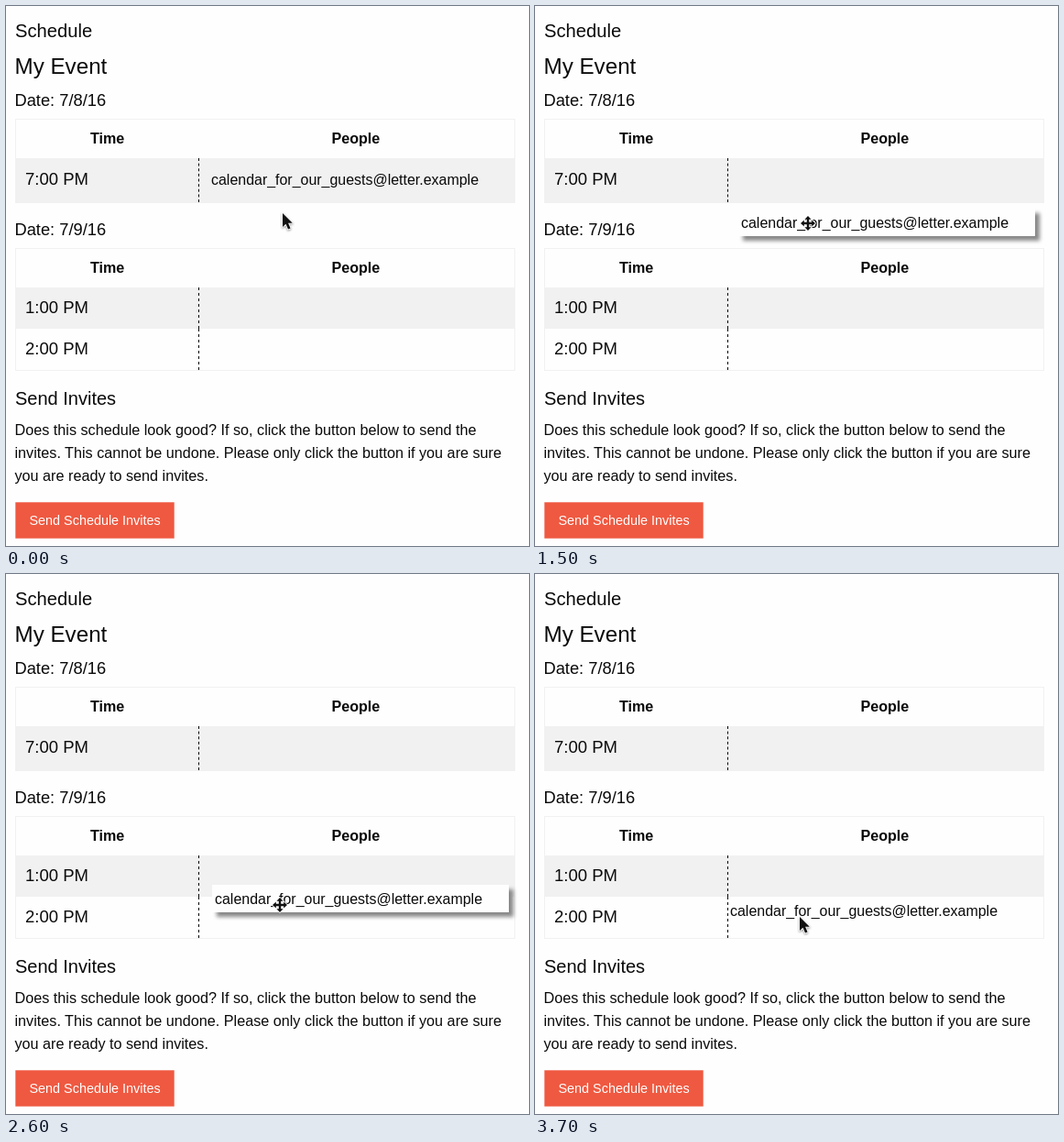
These frames come from a looping animation (571 px wide and 589 px high, 5.2 s). An HTML page:

```html
<!DOCTYPE html>
<html lang="en">
<head>
<meta charset="utf-8">
<title>Schedule</title>
<style>
  html, body { margin: 0; width: 100%; height: 100%; overflow: hidden; background: #fefefe; }
  svg { display: block; width: 571px; height: 589px; font-family: "Liberation Sans", Arial, sans-serif; }
  text { fill: #0a0a0a; }
  .table { fill: none; stroke: #f1f1f1; }
  .row { fill: #f1f1f1; }
  .split { stroke: #0a0a0a; stroke-dasharray: 3; }
  .date { font-size: 18.3px; }
  .head { font-size: 16.1px; font-weight: bold; }
  .time { font-size: 18.5px; }
  .body { font-size: 16.2px; }
  .mail { font-size: 15.96px; }
  #card { fill: #fefefe; filter: drop-shadow(5px 5px 2px #888); }
  #arrow, #cross { fill: #111; stroke: #fff; stroke-width: 1.6; paint-order: stroke; stroke-linejoin: round; }
  #arrow { filter: drop-shadow(0 1px 1px #0006); }
</style>
</head>
<body>
<svg viewBox="0 0 571 589">
  <text x="10" y="34" font-size="20.2">Schedule</text>
  <text x="9.5" y="74" font-size="24.2">My Event</text>

  <text class="date" x="9.5" y="109">Date: 7/8/16</text>
  <rect class="row" x="10" y="166" width="546" height="49"/>
  <rect class="table" x="10.5" y="123.5" width="545" height="91"/>
  <text class="head" x="92" y="150">Time</text>
  <text class="head" x="355.5" y="150">People</text>
  <path class="split" d="M210.5 166v48" style="stroke-dasharray: 3 2.625"/>
  <text class="time" x="21" y="195">7:00 PM</text>

  <text class="date" x="9.5" y="250">Date: 7/9/16</text>
  <rect class="row" x="10" y="307" width="546" height="45"/>
  <rect class="table" x="10.5" y="264.5" width="545" height="133"/>
  <text class="head" x="92" y="291">Time</text>
  <text class="head" x="355.5" y="291">People</text>
  <path class="split" d="M210.5 307v45"/>
  <path class="split" d="M210.5 352v45"/>
  <text class="time" x="21" y="335">1:00 PM</text>
  <text class="time" x="21" y="380">2:00 PM</text>

  <text x="10" y="435" font-size="20">Send Invites</text>
  <text class="body" x="9.5" y="468">Does this schedule look good? If so, click the button below to send the</text>
  <text class="body" x="9.5" y="493">invites. This cannot be undone. Please only click the button if you are sure</text>
  <text class="body" x="9.5" y="518">you are ready to send invites.</text>
  <rect x="10.3" y="541.3" width="173.4" height="39.4" fill="#ef5941"/>
  <text x="25.5" y="566" font-size="14.4" style="fill:#fff">Send Schedule Invites</text>

  <g id="item">
    <rect id="card" width="324" height="30"/>
    <text class="mail" x="3" y="21">calendar_for_our_guests@letter.example</text>
  </g>
  <path id="arrow" d="M0 0V15L3.5 11.8L6 17.6L8.6 16.5L6.1 10.8H10.8Z"/>
  <path id="cross"/>
</svg>
<script>
const LOOP = 5200, STEP = 50, LIFT = 1000, DROP = 3500;
const [item, card, arrow, cross] = ["item", "card", "arrow", "cross"].map(id => document.getElementById(id));

// pointer strokes; power > 1 speeds up along the way, bow bends the line
const origin = { x: 302, y: 226 };
const moves = [
  { from: 0, to: 500, x: 297, y: 190, bow: [-13, -25] },
  { from: 950, to: 1150, x: 297, y: 212 },
  { from: 1200, to: 1400, x: 298, y: 237 },
  { from: 1500, to: 1950, x: 306, y: 305, power: 2.5 },
  { from: 2000, to: 2100, x: 305, y: 335 },
  { from: 2150, to: 2200, x: 306, y: 343 },
  { from: 2450, to: 2800, x: 289, y: 385 },
  { from: 3000, to: 3250, x: 296, y: 386 },
  { from: 3450, to: 3700, x: 289, y: 374 }
];

function pointer(t) {
  let { x, y } = origin;
  for (const { from, to, x: endX, y: endY, power = 1, bow = [0, 0] } of moves) {
    if (t < from) break;
    const k = Math.min(1, (t - from) / (to - from)) ** power;
    const bend = Math.sin(Math.PI * k);
    x += (endX - x) * k + bow[0] * bend;
    y += (endY - y) * k + bow[1] * bend;
  }
  return [Math.round(x), Math.round(y)];
}

const place = (el, x, y) => el.setAttribute("transform", `translate(${x} ${y})`);
const show = (el, on) => el.setAttribute("visibility", on ? "visible" : "hidden");

// one arm of the move cursor, turned four times
let arm = [[-1.2, -1.2], [-1.2, -4.2], [-3.6, -4.2], [0, -8], [3.6, -4.2], [1.2, -4.2]];
const outline = [];
for (let n = 0; n < 4; n++) {
  outline.push(...arm);
  arm = arm.map(([x, y]) => [-y, x]);
}
cross.setAttribute("d", "M" + outline.join("L") + "Z");

function draw(now) {
  const t = Math.floor(now % LOOP / STEP) * STEP;
  const [x, y] = pointer(t);
  const dragging = t >= LIFT && t < DROP;
  const moving = dragging || t < LIFT && y < 205;

  if (dragging) {
    // the card trails the pointer by one step
    const [cx, cy] = pointer(t - STEP);
    place(item, cx - 76, cy - 16);
  } else if (t < LIFT) place(item, 221, 174);
  else place(item, 210, 352);

  show(card, dragging);
  show(cross, moving);
  show(arrow, !moving);
  place(moving ? cross : arrow, x, y);
}

const start = performance.now();
function frame() {
  draw(performance.now() - start);
  requestAnimationFrame(frame);
}
frame();
</script>
</body>
</html>
```
